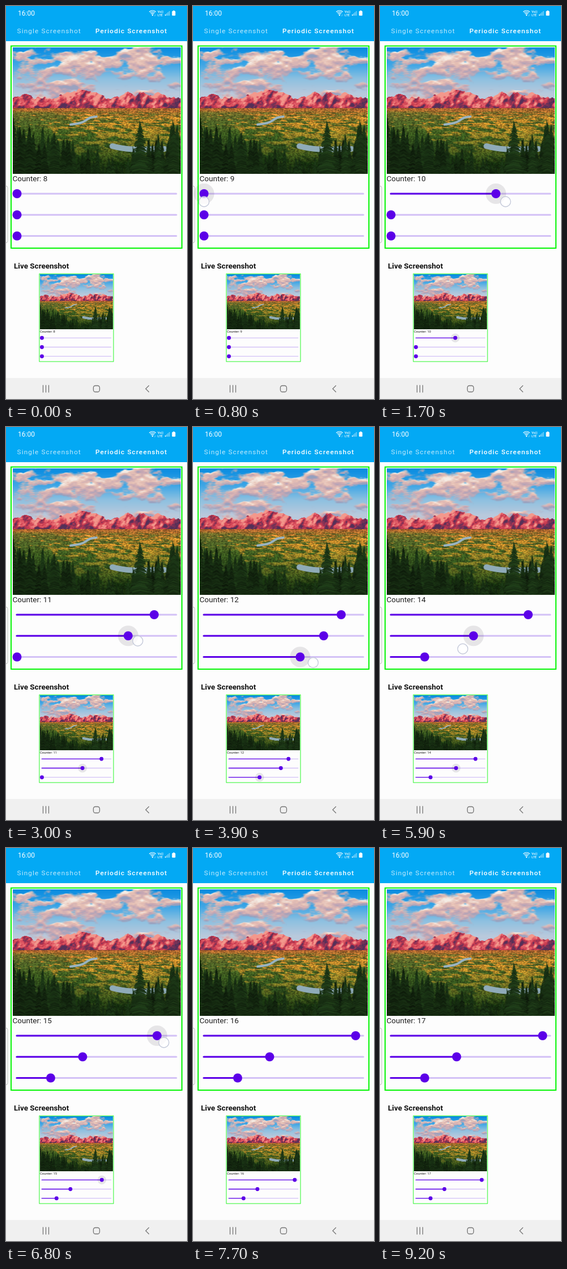
These frames come from a looping animation (320 px wide and 693 px high, 9300 ms). An HTML page with a canvas:

```html
<!DOCTYPE html>
<html lang="en">
<head>
<meta charset="utf-8">
<title>Periodic Screenshot</title>
<style>
html, body { margin: 0; width: 100%; height: 100%; overflow: hidden; background: #fdfdfd; }
canvas { display: block; }
</style>
</head>
<body>
<canvas id="stage" width="320" height="693"></canvas>
<script>
const ctx = document.getElementById('stage').getContext('2d');
const LOOP = 9300, STEP = 100, PURPLE = '#5c00e8';
const REST = 19.5, TRACKS = [0, 1, 2];

// Each drag eases a thumb to x; the finger sits dx, dy away from it
const DRAGS = [
  { slider: 0, from: 800, to: 2114, x: 262, dx: 17, dy: 14 },
  { slider: 1, from: 2400, to: 3117, x: 231, dx: 17, dy: 9 },
  { slider: 2, from: 3450, to: 4062, x: 225, dx: 23, dy: 10 },
  { slider: 2, from: 4100, to: 5000, x: 79, dx: -19, dy: 10 },
  { slider: 1, from: 5400, to: 6196, x: 135.5, dx: -19, dy: 23 },
  { slider: 0, from: 6600, to: 7300, x: 287.5, dx: 12, dy: 12 }
];

const clamp = v => Math.max(0, Math.min(1, v));
const smooth = v => (v = clamp(v), v * v * (3 - 2 * v));
const lerp = (a, b, k) => a + (b - a) * k;
const trackY = i => 331 + 37.25 * i;
const dragAt = t => DRAGS.find(d => t >= d.from && t < d.to + STEP);

function thumbX(i, t) {
  return DRAGS.filter(d => d.slider === i)
    .reduce((x, d) => lerp(x, d.x, smooth((t - d.from) / (d.to - d.from))), REST);
}

// Value noise
function hash(x, y) {
  const v = Math.sin(x * 127.1 + y * 311.7) * 43758.5453;
  return v - Math.floor(v);
}

function noise(x, y) {
  const i = Math.floor(x), j = Math.floor(y), u = smooth(x - i), v = smooth(y - j);
  return lerp(lerp(hash(i, j), hash(i + 1, j), u), lerp(hash(i, j + 1), hash(i + 1, j + 1), u), v);
}

function fbm(x, y) {
  let sum = 0;
  for (let o = 0, a = 0.53; o < 4; o++, a /= 2) sum += a * noise(x * 2 ** o + o * 17, y * 2 ** o);
  return sum;
}

const palette = (...colors) => colors.map(c => [1, 3, 5].map(i => parseInt(c.slice(i, i + 2), 16)));
const blend = (a, b, k) => a.map((v, i) => lerp(v, b[i], k));

function ramp(colors, v) {
  const p = clamp(v) * (colors.length - 1), i = Math.min(Math.floor(p), colors.length - 2);
  return blend(colors[i], colors[i + 1], p - i);
}

const SKY = palette('#078be0', '#36a3e6', '#8cc0e0', '#b9c9dc');
const CLOUD = palette('#9aa0bd', '#cfa8b0', '#f0c2b2', '#fff0e4');
const ROCK = palette('#543058', '#8d3355', '#c9394e', '#e4626a', '#f3988c');
const FIELD = palette('#a8602e', '#d08d2c', '#bb8a28', '#948026', '#6d7022', '#3f561a', '#223b12', '#162b0e');
const FOREST = palette('#7a6c2a', '#4f6326', '#3a5a1e', '#2a471a', '#18330f', '#10240c');
const PEAKS = [[35, 153], [107, 150], [131, 144], [153, 149], [215, 150], [242, 150], [268, 152]];
const BASE = 180;

const ridge = x => Math.min(161, ...PEAKS.map(([px, py]) => py + 0.5 * Math.abs(x - px))) + 5 * noise(x / 4, 3) - 2;
const puff = (x, y, cx, cy, w, h) => Math.exp(-(((x - cx) / w) ** 2) - ((y - cy) / h) ** 2);

function skyColor(x, y) {
  const density = dy => fbm(x / 30, (y + dy) / 14);
  const cover = density(0) + 0.3 * puff(x, y, 100, 89, 28, 13) + 0.35 * puff(x, y, 232, 98, 42, 15)
    + 0.1 * smooth((y - 100) / 20);
  const light = 0.62 + 2.2 * (density(4) - density(-1)) - 0.3 * smooth((y - 105) / 30);
  return blend(ramp(SKY, (y - 73) / 82), ramp(CLOUD, light), 0.95 * smooth((cover - 0.52) / 0.16));
}

function rockColor(x, y) {
  return ramp(ROCK, 0.55 + 2.4 * (fbm((x + y * 0.6) / 7, (y - x * 0.3) / 9) - 0.5) - (y - 165) / 60);
}

function landColor(x, y) {
  const d = (y - BASE) / 116;
  const left = 0.25 * clamp((150 - x) / 90) * smooth((y - 182) / 5);
  const wood = smooth((fbm(x / (9 + d * 9), y / (3 + d * 12)) + left - 0.38) / 0.25);
  const grain = 0.65 + 0.7 * noise(x / 1.6, y / 1.6);
  return blend(ramp(FIELD, d), ramp(FOREST, d), wood * smooth((y - 181) / 8)).map(v => v * grain);
}

// Landscape, painted in stage coordinates shifted to its own corner
function paintPhoto() {
  const canvas = document.createElement('canvas');
  canvas.width = 297;
  canvas.height = 223;
  const c = canvas.getContext('2d'), pixels = c.createImageData(297, 223);
  for (let x = 0; x < 297; x++) {
    const top = ridge(x + 11.5);
    for (let y = 0; y < 223; y++) {
      const sx = x + 11.5, sy = y + 73;
      const color = sy < top ? skyColor(sx, sy) : sy < BASE ? rockColor(sx, sy) : landColor(sx, sy);
      pixels.data.set([...color, 255], 4 * (y * 297 + x));
    }
  }
  c.putImageData(pixels, 0, 0);
  c.translate(-11.5, -73);

  let seed = 7;
  const rnd = (lo, hi) => {
    seed = (seed * 16807) % 2147483647;
    return lo + (hi - lo) * seed / 2147483647;
  };

  const river = (width, color, x0, y0, ...curve) => {
    c.strokeStyle = color;
    c.lineWidth = width;
    c.beginPath();
    c.moveTo(x0, y0);
    c.bezierCurveTo(...curve);
    c.stroke();
  };
  c.lineCap = 'round';
  river(4, '#98b3c2', 160, 195, 135, 197, 150, 206, 114, 209);
  river(10, '#8fabb8', 188, 247, 220, 256, 250, 252, 280, 252);

  const fir = (x, top, width) => {
    const shade = rnd(0, 14);
    for (let y = top; y < 298; y += 1.5) {
      const w = 0.6 + width * clamp((y - top) / 75) ** 0.8, l = rnd(15, 31) + shade;
      c.lineWidth = 1.8;
      c.strokeStyle = `rgb(${l * 0.75}, ${l * 1.45}, ${l * 0.6})`;
      c.beginPath();
      c.moveTo(x - w * rnd(0.5, 1.1), y + 3);
      c.lineTo(x + rnd(-1, 1), y);
      c.lineTo(x + w * rnd(0.5, 1.1), y + 3);
      c.stroke();
    }
  };
  for (let i = 0; i < 48; i++) {
    const u = (i * 0.618) % 1;
    fir(11 + 298 * u, 198 + 62 * Math.sin(Math.PI * u ** 1.3) + rnd(-6, 30), rnd(9, 14));
  }
  fir(237, 206, 16);
  return canvas;
}

const photo = paintPhoto();

function disc(x, y, r, fill) {
  ctx.fillStyle = fill;
  ctx.beginPath();
  ctx.arc(x, y, r, 0, 7);
  ctx.fill();
}

function line(points, color, width) {
  ctx.strokeStyle = color;
  ctx.lineWidth = width;
  ctx.beginPath();
  points.forEach(p => ctx.lineTo(...p));
  ctx.stroke();
}

function text(str, x, y, font, color, spacing = 0) {
  ctx.font = font + ' Roboto, sans-serif';
  ctx.letterSpacing = spacing + 'px';
  ctx.fillStyle = color;
  ctx.fillText(str, x, y);
}

function slider(i, t) {
  const x = thumbX(i, t), y = trackY(i), drag = dragAt(t);
  line([[19, y], [301, y]], '#d3c1f6', 3);
  line([[19, y], [x, y]], PURPLE, 3);
  if (drag && drag.slider === i) disc(x, y, 18, 'rgba(45,40,60,.11)');
  disc(x, y, 8, PURPLE);
}

function panel(t) {
  ctx.fillStyle = '#fdfdfd';
  ctx.fillRect(8, 70, 304, 358);
  ctx.drawImage(photo, 11.5, 73);
  text('Counter: ' + Math.floor(8 + (t + 400) / 1000), 11.5, 309, '13.5px', '#202020');
  TRACKS.forEach(i => slider(i, t));
  ctx.strokeStyle = '#05f505';
  ctx.lineWidth = 2;
  ctx.strokeRect(9, 70.5, 302, 356.5);
}

function touch(t) {
  const d = dragAt(t);
  if (!d) return;
  const x = thumbX(d.slider, t) + d.dx * clamp((t - d.from) / 200);
  disc(x, trackY(d.slider) + d.dy, 9, 'rgba(255,255,255,.78)');
  ctx.strokeStyle = '#c5cada';
  ctx.lineWidth = 1.4;
  ctx.stroke();
}

function statusIcons() {
  ctx.strokeStyle = '#fff';
  ctx.lineWidth = 1.2;
  for (const r of [3, 5.5, 8]) {
    ctx.beginPath();
    ctx.arc(259, 16, r, -2.3, -0.84);
    ctx.stroke();
  }
  disc(259, 16, 1.2, '#fff');
  text('↓↑', 261, 18, '5px', '#fff');
  text('Vo))', 268, 12, '500 5.5px', '#fff');
  text('LTE', 268, 17.5, '500 5.5px', '#fff');
  for (let i = 0; i < 4; i++) {
    ctx.fillStyle = i < 1 ? '#fff' : 'rgba(255,255,255,.5)';
    ctx.fillRect(281 + i * 2.3, 15 - i * 2, 1.5, 2 + i * 2);
  }
  ctx.fillStyle = '#fff';
  ctx.fillRect(295, 8, 3, 1.5);
  ctx.beginPath();
  ctx.roundRect(293.5, 9, 6, 8, 1);
  ctx.fill();
}

function chrome() {
  ctx.fillStyle = '#fdfdfd';
  ctx.fillRect(0, 0, 320, 693);
  ctx.fillStyle = '#03a9f4';
  ctx.fillRect(0, 0, 320, 62);
  text('16:00', 21, 17, '12px', '#fff');
  text('Single Screenshot', 19.5, 47.5, '11.8px', 'rgba(255,255,255,.75)', 1.13);
  text('Periodic Screenshot', 158, 47.5, '500 11.8px', '#fff', 1.1);
  statusIcons();
  text('Live Screenshot', 14, 462.5, 'bold 13.5px', '#111');

  ctx.fillStyle = '#f0f0f0';
  ctx.fillRect(0, 656, 320, 37);
  for (const x of [65.5, 70.5, 75.5]) line([[x, 669], [x, 681]], '#747474', 1.3);
  ctx.beginPath();
  ctx.roundRect(154.5, 669.5, 11, 11, 3.5);
  ctx.stroke();
  line([[252.5, 669.5], [247, 675], [252.5, 680.5]], '#747474', 1.3);
}

function draw(t) {
  chrome();
  panel(t);
  ctx.save();
  const k = 132 / 304;
  ctx.translate(58.5 - 8 * k, 472 - 70 * k);
  ctx.scale(k, k);
  panel(t - STEP);
  ctx.restore();
  ctx.beginPath();
  ctx.roundRect(-5, 317.5, 8, 100, 3);
  ctx.strokeStyle = '#bdbdbd';
  ctx.lineWidth = 1;
  ctx.stroke();
  touch(t);
}

ctx.lineCap = 'round';
const start = performance.now();
function tick() {
  const t = (performance.now() - start) % LOOP;
  draw(Math.floor(t / STEP) * STEP);
  requestAnimationFrame(tick);
}
tick();
</script>
</body>
</html>
```
